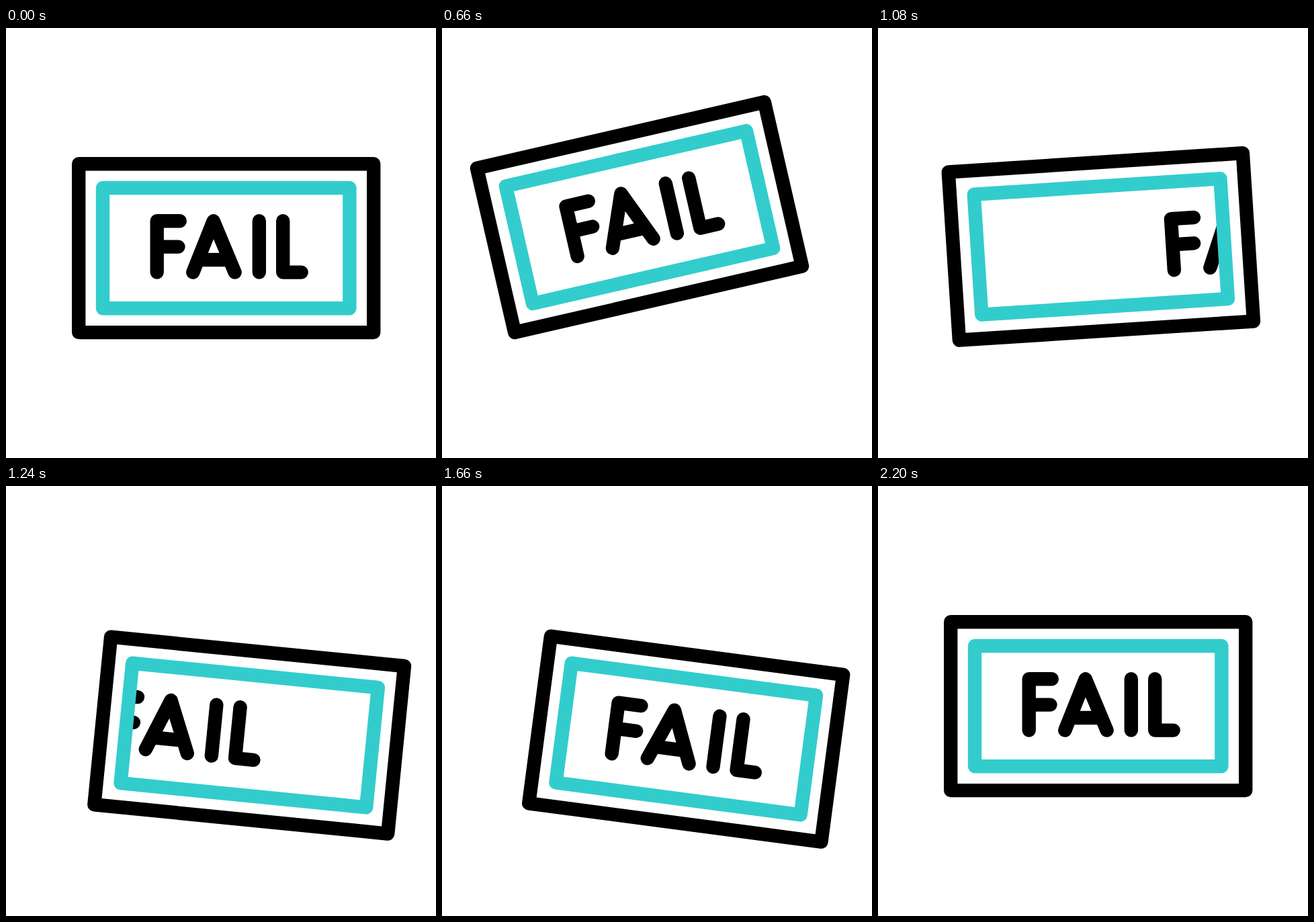
Recreate the animation shown at these times as an HTML page. Size 640 by 640 pixels, loop 2.4 s.

```html
<!DOCTYPE html>
<html lang="en">
<head>
<meta charset="utf-8">
<title>Fail stamp</title>
<style>
  html, body { margin: 0; height: 100%; overflow: hidden; background: #fff; }
  svg { display: block; width: 100%; height: 100%; }
</style>
</head>
<body>
<svg viewBox="0 0 640 640" fill="none" stroke="#000" stroke-width="20.4" stroke-linecap="round" stroke-linejoin="round" role="img" aria-label="FAIL">
  <defs>
    <clipPath id="window"><rect x="144" y="238" width="367.4" height="179.3"/></clipPath>
    <path id="word" d="M258.8 287.3H224.7V363.6M224.7 325.6H256.5
      M278.3 363.6L308.7 287.3L340.6 363.6M287 345H332
      M376.8 287.3V363.6 M412.2 287.3V363.6H439.7"/>
  </defs>
  <g id="stamp">
    <g clip-path="url(#window)">
      <use id="leaving" href="#word"/>
      <use id="entering" href="#word"/>
    </g>
    <rect x="144" y="238" width="367.4" height="179.3" stroke="#3cc"/>
    <rect x="108.2" y="202.3" width="439" height="250.8"/>
  </g>
</svg>
<script>
const LOOP = 2400;
const [stamp, leaving, entering] =
  ['stamp', 'leaving', 'entering'].map(id => document.getElementById(id));

// Eased progress from 0 to 1 between two times
function ease(t, from, to) {
  const p = Math.min(1, Math.max(0, (t - from) / (to - from)));
  return p * p * (3 - 2 * p);
}

function move(el, x, y = 0) {
  el.setAttribute('transform', `translate(${x} ${y})`);
}

function draw() {
  const t = performance.now() % LOOP;
  const lift = ease(t, 200, 800);
  const swing = ease(t, 800, 1400);
  const settle = ease(t, 1400, 2200);

  // The stamp turns about its lower left corner
  const angle = -15 * lift + 25 * swing - 10 * settle;
  const shift = swing - settle;
  stamp.setAttribute('transform',
    `translate(${28 * shift} ${25.6 * shift}) rotate(${angle} 108.2 453.1)`);

  // One word slides out on the right while the next comes in on the left
  move(leaving, 463 * swing, 13 * swing);
  move(entering, -565 + 560 * swing + 5 * settle);

  requestAnimationFrame(draw);
}
draw();
</script>
</body>
</html>
```
